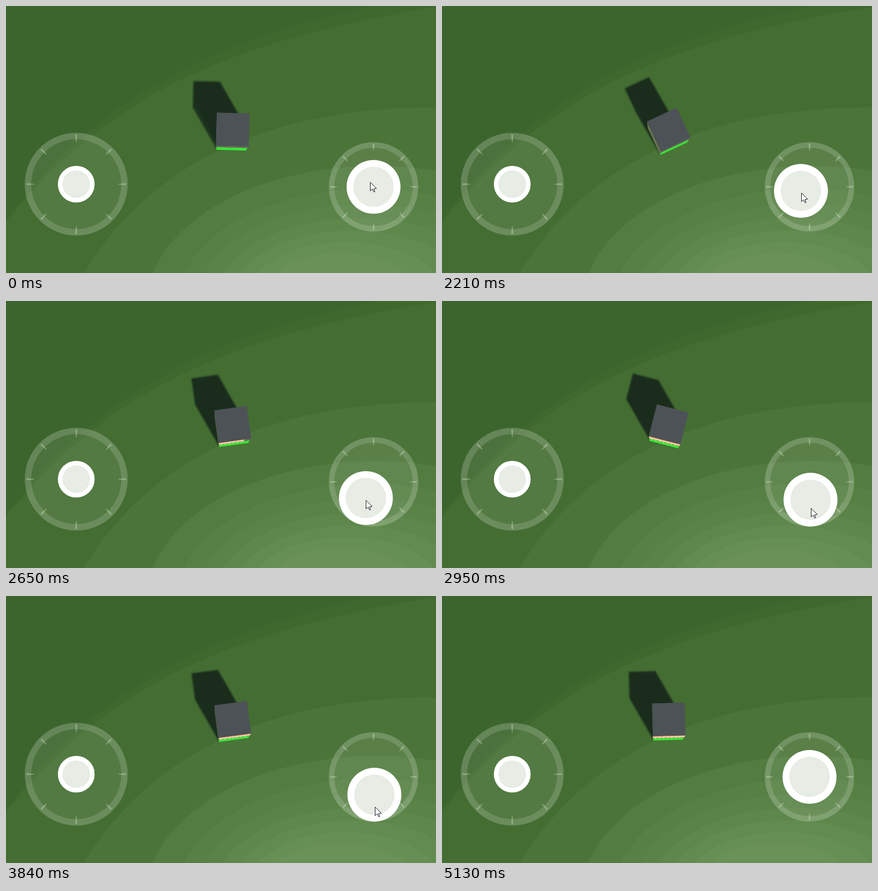
Recreate the animation shown at these times as an HTML page with a canvas. Size 802 by 499 pixels, loop 5280 ms.

```html
<!DOCTYPE html>
<html lang="en">
<head>
<meta charset="utf-8">
<title>Twin-stick cube</title>
<style>
  html, body { margin: 0; width: 100%; height: 100%; overflow: hidden; background: #3b652c; }
  canvas { display: block; }
</style>
</head>
<body>
<canvas id="stage" width="802" height="499"></canvas>
<script>
const ctx = document.getElementById('stage').getContext('2d');
const LOOP = 5280, TAU = Math.PI * 2;

// The scene rests, then advances in even steps.
const START = 1908, STEP = 145.2;
const GRAB = 1, RELEASE = 18, LEAVE = 23;

// key points: step, value(s)
const TURN = [[0, 1.4], [1, -3.8], [3, -25], [5, -19.3], [8, 14.5], [10, -6.3], [14, -7.6], [18, -1.5]];
const POINTER = [[0, 679, 329], [1, 677, 332], [5, 662, 365], [8, 688, 387], [14, 688, 394],
                 [19, 687, 394], [20, 682, 409], [22, 746, 498]];

const REST = [685.5, 338], REACH = 33.4;

const mix = (a, b, k) => a + (b - a) * k;
const mixPoint = (p, q, k) => p.map((v, i) => mix(v, q[i], k));

function track(keys, step) {
  const next = keys.findIndex(key => key[0] > step);
  if (next < 0) return keys[keys.length - 1].slice(1);
  const a = keys[next - 1], b = keys[next];
  return mixPoint(a, b, (step - a[0]) / (b[0] - a[0])).slice(1);
}

// The knob follows the pointer but stays inside its ring.
function knobAt([x, y], step) {
  if (step < GRAB || step >= RELEASE) return REST;
  const dx = x - REST[0], dy = y - 3 - REST[1];
  const k = Math.min(1, REACH / Math.hypot(dx, dy));
  return [REST[0] + dx * k, REST[1] + dy * k];
}

function circle(x, y, r, color) {
  ctx.fillStyle = color;
  ctx.beginPath();
  ctx.arc(x, y, r, 0, TAU);
  ctx.fill();
}

function addPolygon(points) {
  points.forEach((p, i) => i ? ctx.lineTo(...p) : ctx.moveTo(...p));
  ctx.closePath();
}

function polygon(points, color) {
  ctx.fillStyle = color;
  ctx.beginPath();
  addPolygon(points);
  ctx.fill();
}

// everything below one Bézier curve
function hill(x, y, curve, color) {
  ctx.fillStyle = color;
  ctx.beginPath();
  ctx.moveTo(x, y);
  ctx.bezierCurveTo(...curve);
  ctx.lineTo(802, 0);
  ctx.lineTo(802, 499);
  ctx.lineTo(0, 499);
  ctx.fill();
}

function ground() {
  ctx.fillStyle = '#3b652c';
  ctx.fillRect(0, 0, 802, 499);
  hill(0, 399, [143, 208, 330, 76, 690, 0], '#3f682e');
  hill(0, 404, [153, 218, 332, 76, 802, 2], '#446d32');
  ctx.save();
  ctx.beginPath();
  ctx.rect(145, 189, 657, 310);
  ctx.clip();
  ctx.fillStyle = '#4b7439';
  ctx.beginPath();
  ctx.moveTo(145, 499);
  ctx.bezierCurveTo(270, 290, 500, 189, 802, 189);
  ctx.lineTo(802, 499);
  ctx.fill();
  ctx.restore();
  for (let i = 0; i < 7; i++) {
    const cy = 562 - i * 3.5, ry = cy - 299 - 163 * (i / 6) ** 0.75;
    ctx.fillStyle = `rgb(${82 + i * 4}, ${124 + i * 3.7}, ${64 + i * 4})`;
    ctx.beginPath();
    ctx.ellipse(690 - i * 11, cy, ry * (1.63 + i * 0.03), ry, 0, 0, TAU);
    ctx.fill();
  }
}

// corners: back left, back right, front right, front left
function square(cx, cy, half, angle) {
  const c = Math.cos(angle) * half, s = Math.sin(angle) * half;
  return [[cx - c + s, cy - s - c], [cx + c + s, cy + s - c],
          [cx + c - s, cy + s + c], [cx - c - s, cy - s + c]];
}

function castShadow(angle) {
  ctx.filter = 'blur(1.5px)';
  ctx.fillStyle = '#1a2d1d';
  ctx.beginPath();
  for (let k = 0; k <= 1; k += 1 / 64) {
    addPolygon(square(mix(374, 418, k), mix(166, 243, k), 25, angle));
  }
  ctx.fill();
  ctx.filter = 'none';
}

function cube(angle, step) {
  const top = square(423, 230.5, 30.5, angle);
  const base = square(420.5, 242, 27.5, angle);
  // part of the front face: u runs left to right, v from top to base
  const at = (u, v) => mixPoint(mixPoint(top[3], top[2], u), mixPoint(base[3], base[2], u), v);
  const patch = (u0, u1, v0, v1, color) =>
    polygon([at(u0, v0), at(u1, v0), at(u1, v1), at(u0, v1)], color);

  polygon([top[0], top[3], base[3], base[0]], '#67734f');
  patch(0, 1, 0, 0.5, '#68605f');
  patch(0, 1, 0.42, 1, '#3be235');
  const lit = Math.max(0, Math.min(1, (step - 4) * 0.4));
  patch(0, lit, 0, 0.46, '#d98d60');
  patch(0, lit, 0.16, 0.36, '#f8e3cc');
  for (let u = 0.06; u < lit - 0.05; u += 0.13) patch(u, u + 0.05, 0.46, 0.6, '#c8efb9');
  polygon(top, '#4d5257');
}

function stick(x, y, radius, knob, knobR) {
  circle(x, y, radius, 'rgba(240,248,225,.085)');
  ctx.strokeStyle = 'rgba(255,255,255,.14)';
  ctx.lineWidth = radius * 0.125;
  ctx.beginPath();
  ctx.arc(x, y, radius * 0.9375, 0, TAU);
  ctx.stroke();
  const inner = radius * 0.82, outer = radius * 0.965;
  for (let i = 0; i < 8; i++) {
    ctx.save();
    ctx.translate(x, y);
    ctx.rotate(i * TAU / 8);
    polygon([[inner, -0.8], [outer, -1.8], [outer, 1.8], [inner, 0.8]], 'rgba(225,240,210,.35)');
    ctx.restore();
  }
  circle(...knob, knobR, '#fff');
  circle(...knob, knobR * 0.75, '#e7ece4');
}

function cursor(x, y) {
  ctx.save();
  ctx.translate(Math.round(x) + 0.5, Math.round(y) + 0.5);
  ctx.lineWidth = 1;
  ctx.strokeStyle = '#15151f';
  polygon([[0, 0], [0, 16], [4, 12.5], [6.5, 18], [8.5, 17.5], [6.5, 12], [11.5, 11.5]], '#fff');
  ctx.stroke();
  ctx.restore();
}

function draw() {
  const t = performance.now() % LOOP;
  const step = Math.max(0, Math.floor((t - START) / STEP) + 1);
  const angle = track(TURN, step)[0] * TAU / 360;
  const pointer = track(POINTER, step);
  ground();
  castShadow(angle);
  cube(angle, step);
  stick(131, 333, 96, [131, 333], 34.3);
  stick(...REST, 83.5, knobAt(pointer, step), 50.3);
  if (step < LEAVE) cursor(...pointer);
  requestAnimationFrame(draw);
}
draw();
</script>
</body>
</html>
```
